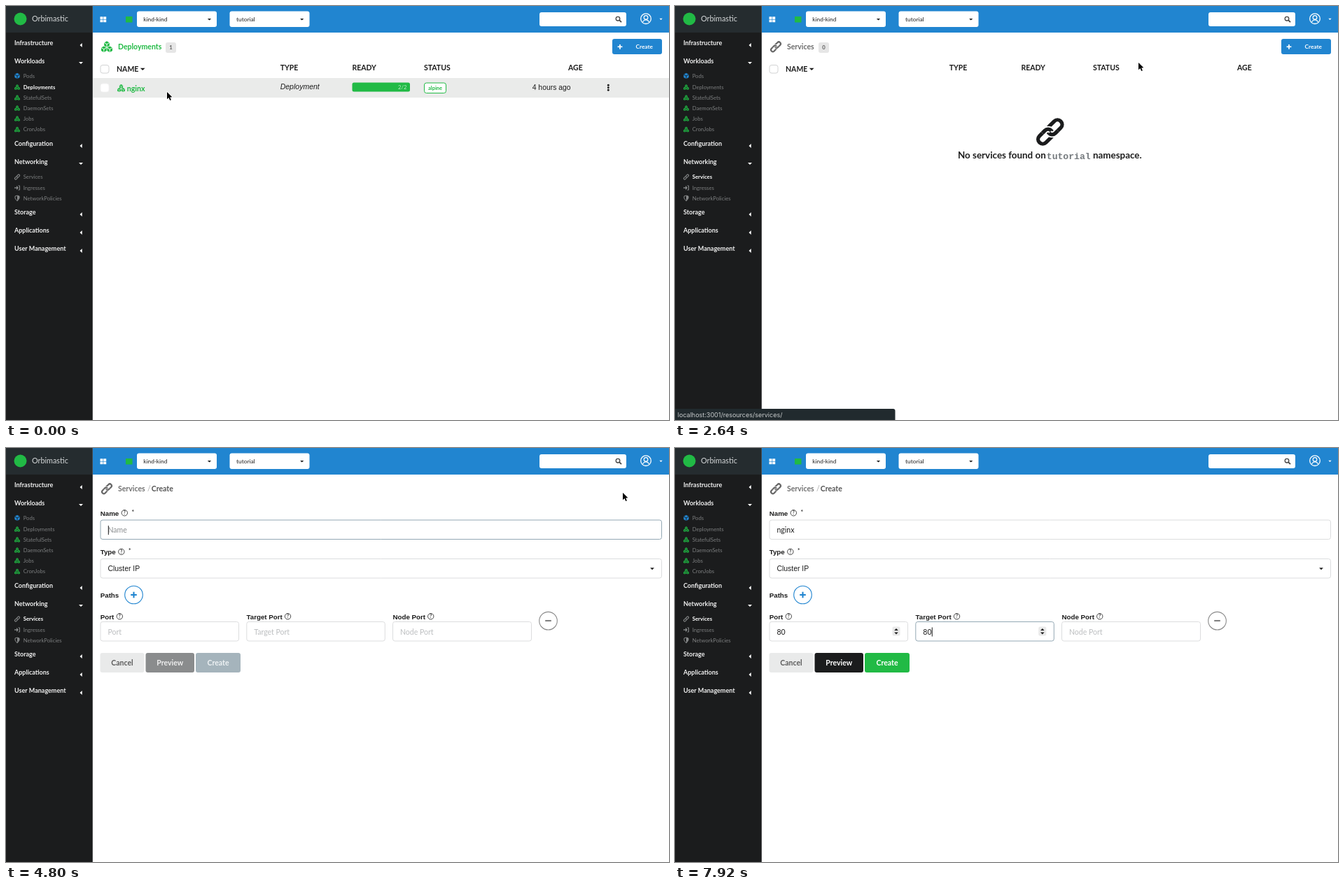
An HTML page with a canvas that plays this animation: 947x592 px, repeating every 8000 ms.

```html
<!DOCTYPE html>
<html lang="en">
<head>
<meta charset="utf-8">
<title>Cluster dashboard</title>
<style>
html, body { margin: 0; width: 100%; height: 100%; overflow: hidden; background: #fff; }
canvas { display: block; }
</style>
</head>
<body>
<canvas id="stage" width="947" height="592"></canvas>
<script>
const ctx = document.getElementById('stage').getContext('2d');
const LOOP = 8000, STEP = 120;
const LATO = 'Lato, sans-serif';
const ARIAL = '"Liberation Sans", Arial, sans-serif';
const MONO = '"Liberation Mono", monospace';
const BLUE = '#2185d0', GREEN = '#21ba45', DARK = '#1b1c1d', INK = '#1d1d1d';

// Times of the events, in ms
const AT = {
  leaveRow: 840, barOn: 1440, services: 1920, barFade: 2760, barOff: 2880,
  form: 3840, spell: 5760, port: 6480, target: 7320
};
const KEYS = {
  name: [4920, 5040, 5160, 5280, 5400],
  port: [6840, 6960],
  target: [7560, 7680]
};
const PATH = [
  [0, 230, 123], [720, 230, 123], [840, 194, 143], [1080, 92, 208], [1320, 37, 243],
  [2400, 37, 243], [2640, 662, 81], [2880, 858, 62], [3120, 881, 64],
  [5640, 881, 64], [5880, 610, 140], [6120, 305, 256], [6240, 267, 270]
];

// ---- drawing helpers ----
function text(s, x, y, size, color, o = {}) {
  ctx.font = `${o.style || ''} ${o.weight || 400} ${size}px ${o.font || LATO}`;
  ctx.textAlign = o.align || 'left';
  ctx.fillStyle = color;
  ctx.fillText(s, x, y + size * 0.36);
  return ctx.measureText(s).width;
}
const bold = (s, x, y, size, color, o) => text(s, x, y, size, color, { weight: 700, ...o });

function box(x, y, w, h, r, fill, line) {
  ctx.beginPath();
  if (line) ctx.roundRect(x + .5, y + .5, w - 1, h - 1, r);
  else ctx.roundRect(x, y, w, h, r);
  if (fill) { ctx.fillStyle = fill; ctx.fill(); }
  if (line) { ctx.strokeStyle = line; ctx.lineWidth = 1; ctx.stroke(); }
}
function rect(x, y, w, h, color) {
  ctx.fillStyle = color;
  ctx.fillRect(x, y, w, h);
}
function trace(points) {
  ctx.beginPath();
  points.forEach(([x, y]) => ctx.lineTo(x, y));
  ctx.closePath();
}
function poly(points, color) {
  trace(points);
  ctx.fillStyle = color;
  ctx.fill();
}
function line(points, color, width) {
  ctx.beginPath();
  points.forEach(([x, y]) => ctx.lineTo(x, y));
  ctx.strokeStyle = color;
  ctx.lineWidth = width;
  ctx.stroke();
}
function ring(x, y, r, color, width) {
  ctx.beginPath();
  ctx.arc(x, y, r, 0, 7);
  ctx.strokeStyle = color;
  ctx.lineWidth = width;
  ctx.stroke();
}
function disc(x, y, r, color) {
  ctx.beginPath();
  ctx.arc(x, y, r, 0, 7);
  ctx.fillStyle = color;
  ctx.fill();
}
const down = (x, y, w, color) =>
  poly([[x - w, y - w / 2], [x + w, y - w / 2], [x, y + w / 2]], color);
const up = (x, y, w, color) =>
  poly([[x - w, y + w / 2], [x + w, y + w / 2], [x, y - w / 2]], color);
function plus(x, y, r, color, width) {
  line([[x - r, y], [x + r, y]], color, width);
  line([[x, y - r], [x, y + r]], color, width);
}

// ---- icons ----
function cube(x, y, r, color, gap) {
  const corner = i => [x + r * Math.sin(i * Math.PI / 3), y - r * Math.cos(i * Math.PI / 3)];
  poly([0, 1, 2, 3, 4, 5].map(corner), color);
  for (const i of [1, 3, 5]) line([[x, y], corner(i)], gap, r * .22);
}
function cubes(x, y, r, color, gap) {
  cube(x, y - r * .76, r, color, gap);
  cube(x - r * .95, y + r * .86, r, color, gap);
  cube(x + r * .95, y + r * .86, r, color, gap);
}
// Two interlocked rings of a chain; w is the full width
function chain(x, y, w, color, bg) {
  const k = w / 41;
  const link = (cx, c, lw) => {
    ctx.beginPath();
    ctx.roundRect(cx - 12, -6.6, 24, 13.2, 6.6);
    ctx.strokeStyle = c;
    ctx.lineWidth = lw;
    ctx.stroke();
  };
  const half = (cx, top) => {
    ctx.save();
    ctx.beginPath();
    ctx.rect(-9, top, 18, 14);
    ctx.clip();
    link(cx, bg, 9);
    link(cx, color, 5.4);
    ctx.restore();
  };
  ctx.save();
  ctx.translate(x, y);
  ctx.rotate(-Math.PI / 4);
  ctx.scale(k, k);
  link(-9.5, color, 5.4);
  link(9.5, color, 5.4);
  half(9.5, 0);
  half(-9.5, -14);
  ctx.restore();
}
function signIn(x, y, color) {
  line([[x - 4, y], [x + 1, y]], color, 1.4);
  poly([[x - 1, y - 3], [x + 2, y], [x - 1, y + 3]], color);
  line([[x + 1.5, y - 3], [x + 3.5, y - 3], [x + 3.5, y + 3], [x + 1.5, y + 3]], color, 1);
}
function shield(x, y, color) {
  trace([[x, y - 4], [x + 3, y - 3], [x + 3, y], [x, y + 4], [x - 3, y], [x - 3, y - 3]]);
  ctx.strokeStyle = color;
  ctx.lineWidth = 1;
  ctx.stroke();
  poly([[x, y - 4], [x + 3, y - 3], [x + 3, y], [x, y + 4]], color);
}
function help(x, y) {
  ring(x, y, 4.2, '#333', .9);
  bold('?', x, y + .1, 6.6, '#333', { align: 'center' });
}

// ---- chrome ----
const MENU = [
  ['Infrastructure', 53], ['Workloads', 79, true], ['Configuration', 197],
  ['Networking', 223, true], ['Storage', 295], ['Applications', 321], ['User Management', 347]
];
const ITEMS = [
  ['Pods', 100], ['Deployments', 116], ['StatefulSets', 131], ['DaemonSets', 146],
  ['Jobs', 161], ['CronJobs', 176.5], ['Services', 244.5], ['Ingresses', 260], ['NetworkPolicies', 275]
];

function sidebar(active, mouse) {
  rect(0, 0, 124, 592, DARK);
  rect(0, 0, 124, 38, '#252c2f');
  rect(123, 0, 1, 592, '#484a4b');
  disc(20.5, 18.5, 9, GREEN);
  text('Orbimastic', 37, 18.5, 10.8, '#d5d8d9');
  for (const [label, y, open] of MENU) {
    bold(label, 12, y, 9, '#f0f0f0');
    if (open) down(107, y + 2.5, 3, '#fff');
    else poly([[108.7, y], [108.7, y + 6], [105.5, y + 3]], '#fff');
  }
  ITEMS.forEach(([label, y], i) => {
    const on = label === active;
    const hover = mouse.x < 124 && Math.abs(mouse.y - y) < 7;
    const tone = '#858788';
    if (i === 0) cube(16, y, 4.2, BLUE, DARK);
    else if (i < 6) cubes(16, y, 2.2, GREEN, DARK);
    else if (i === 6) chain(16, y, 8.5, tone, DARK);
    else if (i === 7) signIn(16, y, tone);
    else shield(16, y, tone);
    text(label, 24.7, y, 7.7, on ? '#fff' : hover ? '#d8d8d8' : '#7c7e7f', { weight: on ? 700 : 400 });
  });
}

function topBar() {
  rect(124, 0, 823, 38, BLUE);
  for (const x of [134.5, 139.2]) for (const y of [15.3, 19.6]) rect(x, y, 4, 3.6, '#fff');
  rect(171, 15, 9.5, 8.5, GREEN);
  box(187, 7.5, 114, 22.5, 3, '#fff');
  text('kind-kind', 196.3, 19.3, 8.3, INK);
  down(290.5, 19.3, 2.6, INK);
  box(319.5, 7.5, 114, 22.5, 3, '#fff');
  text('tutorial', 329, 19.3, 8.4, INK);
  down(422.7, 19.3, 2.6, INK);
  box(762, 9, 124, 20, 3, '#fff');
  ring(874, 18.2, 2.8, '#444', 1.3);
  line([[876, 20.2], [879, 23.2]], '#444', 1.7);
  ring(914, 18.2, 7.3, '#fff', 1.3);
  ring(914, 16.4, 2.8, '#fff', 1.2);
  ctx.beginPath();
  ctx.arc(914, 24.6, 4.8, Math.PI * 1.12, Math.PI * 1.88);
  ctx.stroke();
  down(935.5, 18.8, 2.2, '#fff');
}

function listHead(title, count, color, badgeX) {
  bold(title, 160, 58.5, 10.5, color);
  box(badgeX, 52, 15, 15, 3, '#e6e6e6');
  bold(count, badgeX + 7.5, 59.7, 7.7, '#5e5e5e', { align: 'center' });
  box(866, 47, 71, 22, 3, BLUE);
  plus(877, 58.3, 3.4, '#fff', 1.7);
  bold('Create', 911.7, 58.3, 8.3, '#fff', { align: 'center' });
  box(134.5, 84, 13, 12.5, 3, '#fff', '#d2d3d4');
  bold('NAME', 158, 90.3, 10.5, INK);
  down(195.2, 90.4, 3.4, INK);
  [['TYPE', 391.7], ['READY', 494.5], ['STATUS', 597], ['AGE', 803]]
    .forEach(([s, x]) => bold(s, x, 88.2, 10.5, INK));
}

function deployments(t) {
  const hover = t < AT.leaveRow;
  cubes(144, 58, 4.4, GREEN, '#fff');
  listHead('Deployments', '1', GREEN, 228);
  if (hover) rect(124, 103, 823, 28, '#eaebea');
  box(134.5, 110.5, 13, 13, 3, '#fff', hover ? '#f2f2f2' : '#d2d3d4');
  cubes(164.5, 117.4, 3, GREEN, hover ? '#eaebea' : '#fff');
  bold('nginx', 172.8, 117.8, 10.6, GREEN);
  text('Deployment', 391.7, 115.7, 10.5, INK, { font: ARIAL, style: 'italic' });
  box(494.5, 109.5, 82.5, 13, 2.5, GREEN);
  text('2/2', 572.5, 116, 7.7, '#b9ecc5', { align: 'right' });
  box(597, 109.5, 32, 15.5, 3, '#fff', GREEN);
  bold('alpine', 613, 117.2, 7.5, GREEN, { align: 'center' });
  text('4 hours ago', 751.7, 116, 10.4, INK, { font: ARIAL });
  for (const y of [113.2, 116.7, 120.2]) disc(860.3, y, 1.45, INK);
}

function services() {
  chain(144, 58.3, 16.5, '#666', '#fff');
  listHead('Services', '0', '#6c6c6c', 205);
  chain(535.8, 180, 41, DARK, '#fff');
  bold('No services found on', 404, 213.5, 13.4, INK);
  bold('tutorial', 530.8, 214, 13.1, '#74797d', { font: MONO });
  bold('namespace.', 597, 213.5, 13.4, INK);
}

// ---- form ----
const typed = (s, times, t) => s.slice(0, times.filter(k => t >= k).length);

function caretOn(t, from, keys) {
  const last = Math.max(from, ...keys.filter(k => t >= k));
  return (t - last) % 960 < 480;
}

function field(f, t) {
  const value = typed(f.value, f.keys, t);
  const focus = t >= f.from && t < f.to;
  box(f.x, f.y, f.w, 28.5, 3, '#fff', focus ? '#93a8b4' : '#dcddde');
  const cy = f.y + 15;
  let w = 0;
  if (value) w = text(value, f.x + 11, cy, 10.5, INK);
  else text(f.hint, f.x + 11, cy, 10.5, focus ? '#8a8d8f' : '#bcbec0');
  if (focus && caretOn(t, f.from, f.keys)) rect(f.x + 11.3 + w, cy - 6.5, 1, 13, INK);
  if (f.spell && focus && t >= f.spell) {
    ctx.setLineDash([1.5, 1]);
    line([[f.x + 11, cy + 6], [f.x + 11 + w, cy + 6]], '#555', 1);
    ctx.setLineDash([]);
  }
  if (f.spin && (focus || f.hover)) {
    const sx = f.x + 181.5;
    box(sx - 5.5, f.y + 7.5, 11, 13, 2, '#e9e9e9');
    up(sx, f.y + 11.5, 2.8, INK);
    down(sx, f.y + 17, 2.8, INK);
  }
}

function label(s, x, y, helpX, star) {
  bold(s, x, y, 9.75, INK, { font: ARIAL });
  if (helpX) help(helpX, y - .2);
  if (star) text('*', helpX + 10, y - 1.5, 9.5, INK);
}

function button(s, x, w, fill, color) {
  box(x, 293, w, 28, 3, fill);
  bold(s, x + w / 2, 307.3, 10.5, color, { align: 'center' });
}

const inside = (m, x, y, w, h) => m.x >= x && m.x <= x + w && m.y >= y && m.y <= y + h;

function form(t, mouse) {
  const ready = t >= KEYS.name[0];
  chain(144, 58.3, 16.5, '#666', '#fff');
  bold('Services', 160, 58.5, 10.5, '#717171');
  text('/', 202, 58.5, 10.5, '#aaa');
  bold('Create', 207.8, 58.5, 10.5, '#555');

  label('Name', 134.7, 93, 169.3, true);
  field({ x: 134.5, y: 102.5, w: 802.5, value: 'nginx', hint: 'Name', keys: KEYS.name,
    from: AT.form, to: AT.port, spell: AT.spell }, t);
  label('Type', 134.7, 148.5, 164.8, true);
  box(134.5, 158, 802.5, 28.5, 3, '#fff', '#dcddde');
  text('Cluster IP', 145.5, 172.5, 10.4, INK, { font: ARIAL });
  down(923, 172.7, 2.9, INK);

  label('Paths', 134.7, 210.5);
  ring(182.5, 210, 12.8, BLUE, 1.1);
  plus(182.5, 210, 4.3, BLUE, 2.1);

  label('Port', 134.7, 241, 162.3);
  label('Target Port', 343.5, 241, 402.5);
  label('Node Port', 552.5, 241, 606.7);
  field({ x: 134.5, y: 248, w: 198.5, value: '80', hint: 'Port', keys: KEYS.port,
    from: AT.port, to: AT.target, spin: true, hover: inside(mouse, 135, 248, 198, 28) }, t);
  field({ x: 343.3, y: 248, w: 198.5, value: '80', hint: 'Target Port', keys: KEYS.target,
    from: AT.target, to: LOOP, spin: true }, t);
  field({ x: 552, y: 248, w: 199, value: '', hint: 'Node Port', keys: [], from: LOOP, to: LOOP }, t);
  ring(774.5, 247.2, 12.8, '#8a8a8a', 1.1);
  line([[770.2, 247], [778.8, 247]], '#808080', 2.1);

  button('Cancel', 134.5, 63, '#e9eaea', '#5c5c5c');
  button('Preview', 199.5, 69.5, ready ? DARK : '#8a8c8d', ready ? '#fff' : '#eee');
  button('Create', 271, 64, ready ? GREEN : '#a5b4bc', ready ? '#fff' : '#eef2f4');
}

function statusBar(t) {
  if (t < AT.barOn || t >= AT.barOff) return;
  ctx.globalAlpha = t >= AT.barFade ? .5 : 1;
  box(-4, 576, 318.5, 20, 3, '#212a2e');
  text('localhost:3001/resources/services/', 3.8, 584.7, 9, '#c9cccd', { font: 'Inter, sans-serif' });
  ctx.globalAlpha = 1;
}

// ---- pointer ----
function mouseAt(t) {
  let i = 1;
  while (i < PATH.length - 1 && PATH[i][0] < t) i++;
  const [t0, x0, y0] = PATH[i - 1], [t1, x1, y1] = PATH[i];
  const p = Math.min(1, (t - t0) / (t1 - t0));
  return { x: x0 + (x1 - x0) * p, y: y0 + (y1 - y0) * p };
}

function outlined(points, fill, stroke, width) {
  trace(points);
  ctx.lineJoin = 'round';
  ctx.strokeStyle = stroke;
  ctx.lineWidth = width;
  ctx.stroke();
  ctx.fillStyle = fill;
  ctx.fill();
  ctx.lineJoin = 'miter';
}
function arrow() {
  outlined([[0, 0], [0, 10.2], [2.4, 8], [4.2, 12], [5.9, 11.2], [4.2, 7.4], [7.3, 7.3]],
    '#000', '#fff', 1.6);
}
function hand() {
  outlined([[-1, 0], [.6, 0], [1, 4.2], [3, 4], [3.4, 4.8], [5, 4.6], [5.4, 5.6], [6.6, 6],
    [6.6, 9], [5.4, 12.4], [-.4, 12.4], [-3.8, 8], [-3.6, 6.8], [-2.4, 6.8], [-1.2, 8]],
    '#fff', '#000', 1.7);
  for (const x of [.9, 2.7, 4.5]) line([[x, 8], [x, 11]], '#000', .7);
}
function beam() {
  for (const [c, w] of [['#fff', 2.4], ['#111', 1.1]]) {
    line([[0, -5.2], [0, 5.2]], c, w);
    line([[-2.8, -6], [-1, -5.8], [0, -5], [1, -5.8], [2.8, -6]], c, w);
    line([[-2.8, 6], [-1, 5.8], [0, 5], [1, 5.8], [2.8, 6]], c, w);
  }
}

function pointer(t, m) {
  const typing = (t >= KEYS.name[0] && t < 5640) || t >= KEYS.port[0];
  if (typing) return;
  const overField = t >= AT.form && (inside(m, 135, 103, 802, 28) ||
    [135, 343, 552].some(x => inside(m, x, 248, 198, 28)));
  const overLink = ITEMS.some(([, y]) => m.x < 124 && Math.abs(m.y - y) < 7) ||
    (t < AT.form && inside(m, 866, 47, 71, 22));
  ctx.save();
  ctx.translate(m.x, m.y);
  (overField ? beam : overLink ? hand : arrow)();
  ctx.restore();
}

function draw(t) {
  const mouse = mouseAt(t);
  rect(0, 0, 947, 592, '#fff');
  sidebar(t < AT.services ? 'Deployments' : 'Services', mouse);
  topBar();
  if (t < AT.services) deployments(t);
  else if (t < AT.form) services();
  else form(t, mouse);
  statusBar(t);
  pointer(t, mouse);
}

const start = performance.now();
function tick() {
  const t = (performance.now() - start) % LOOP;
  draw(Math.floor(t / STEP) * STEP);
  requestAnimationFrame(tick);
}
tick();
</script>
</body>
</html>
```
